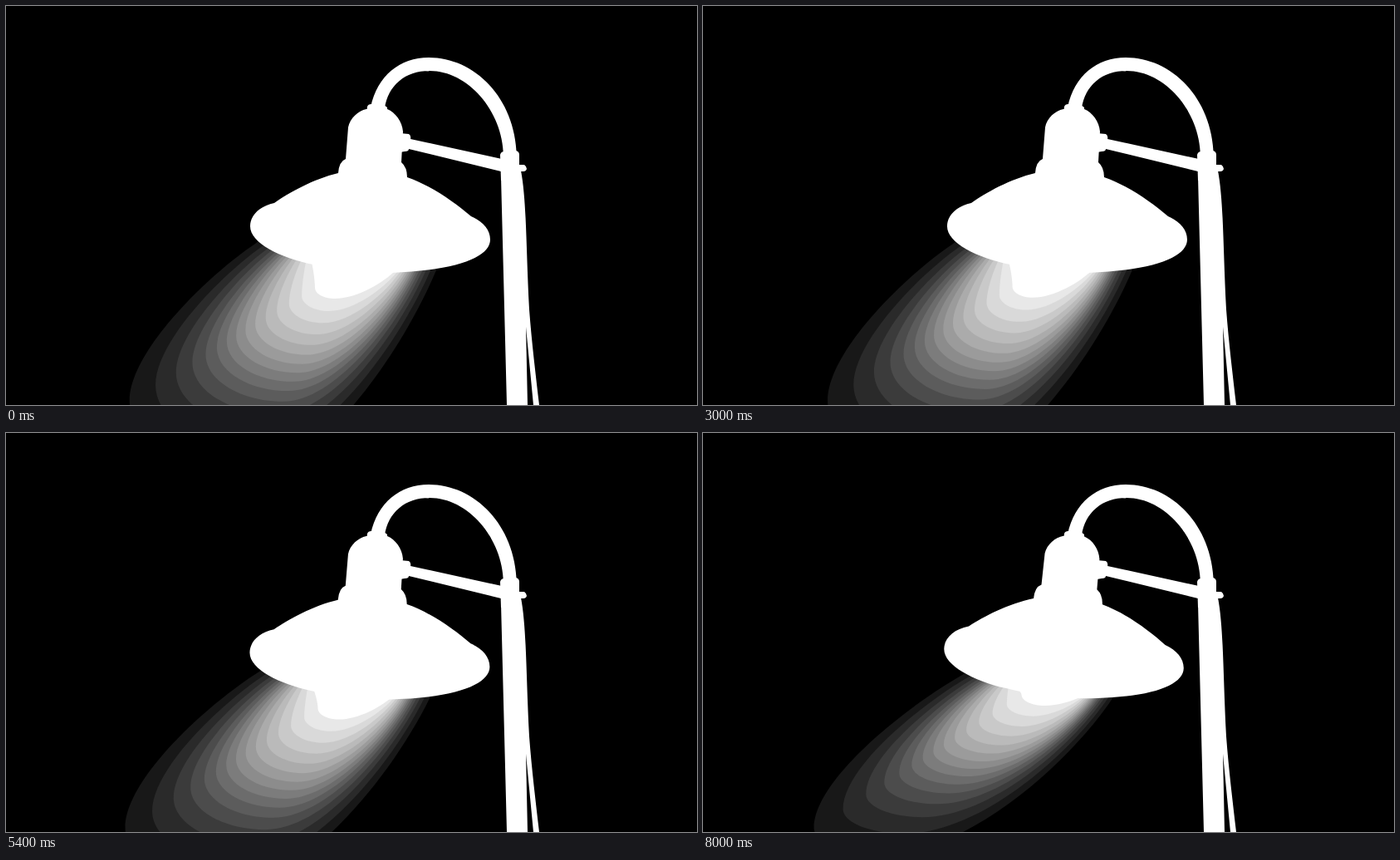
These frames come from a looping animation (832 px wide and 480 px high, 8100 ms). An HTML page:

```html
<!DOCTYPE html>
<html lang="en">
<head>
<meta charset="utf-8">
<title>Street lamp</title>
<style>
html, body { margin: 0; width: 100%; height: 100%; overflow: hidden; background: #000; }
svg { display: block; width: 100vw; height: 100vh; }
</style>
</head>
<body>
<svg viewBox="0 0 832 480">
  <g id="light"></g>
  <g fill="#fff">
    <!-- arched pipe -->
    <path d="M439 122C447 84 474 62 509 62C564 62 613 110 615 180L599 180C598 126 556 78 510 78C480 78 460 96 456 123Z"/>
    <!-- brace and its fittings -->
    <path d="M474 153L485 154Q488 156 487 160L597 184L596 199L485 172Q485 175 480 175L474 176Z"/>
    <path d="M595 179Q596 175 600 175L614 174Q618 175 618 179L618 191L624 191Q627 193 627 196Q626 199 623 199L618 199L618 210L596 210Z"/>
    <!-- post and cable -->
    <path d="M596 205L620 198C627 235 626 290 630 365C633 405 638 445 642 480L635 480L626 386L628 480L603 480Z"/>
    <path d="M435 121Q436 118 440 118L455 119L459 122L459 130L434 130Z"/>
    <path id="head" d="M412 146C414 135 424 126 434 124L459 124C469 128 477 139 478 151L476 188Q483 194 483 206
      C512 216 540 236 560 253C574 259 583 269 583 281C583 300 550 316 480 320
      C440 323 400 318 370 311C330 303 294 285 294 265C294 252 305 241 323 237C340 225 370 208 400 201Q401 187 409 184Z"/>
  </g>
</svg>
<script>
const LOOP = 8100, STEP = 100, BANDS = 14, RIM = 318;

// Beam at rest and fully tilted: its outer edge and its bright core
const rest = {
  outer: { start: 300, left: 156, lowX: 298, lowY: 562, right: 518 },
  core: { start: 367, left: 372, lowX: 396, lowY: 352, right: 469 }
};
const tilted = {
  outer: { start: 322, left: 133, lowX: 212, lowY: 505, right: 493 },
  core: { start: 372, left: 384, lowX: 412, lowY: 327, right: 453 }
};

const mix = (a, b, f) => a + (b - a) * f;

function blend(a, b, f) {
  const out = {};
  for (const key in a) out[key] = mix(a[key], b[key], f);
  return out;
}

const light = document.getElementById("light");
const head = document.getElementById("head");

// Bands lie wider apart near the outer edge
const bands = Array.from({ length: BANDS + 1 }, (_, i) => {
  const u = i / BANDS;
  const g = i === BANDS ? 255 : Math.round(24 + 208 * (i / (BANDS - 1)) ** .95);
  const path = document.createElementNS("http://www.w3.org/2000/svg", "path");
  path.setAttribute("fill", `rgb(${g},${g},${g})`);
  light.append(path);
  return { path, depth: u + 1.2 * u * (1 - u) ** 3 };
});

function contour(outer, core, f) {
  const { start, left, lowX, lowY, right } = blend(outer, core, f);
  const top = mix(286, 304, f);
  const side = mix(475, core.lowY - 13, f);
  const w = right - lowX, h = lowY - RIM;
  return `M${start} ${top}` +
    `C${mix(start, left, .39)} ${mix(top, side, .21)} ${left} ${mix(side, top, .31)} ${left} ${side}` +
    `C${left} ${mix(side, lowY, .55)} ${mix(lowX, left, .55)} ${lowY} ${lowX} ${lowY}` +
    `C${lowX + .37 * w} ${lowY} ${right - .19 * w} ${RIM + .42 * h} ${right} ${RIM}` +
    `L${right - 20} 290L${start + 20} 270Z`;
}

function draw(t) {
  const p = t / LOOP;
  const drift = p ** 3;
  const tilt = 1.7 * p ** 5;
  const sway = 8 * (1 - drift) * Math.cos(2 * Math.PI * (t - 1200) / 2800);
  const outer = blend(rest.outer, tilted.outer, drift);
  const core = blend(rest.core, tilted.core, drift);
  outer.left += sway;
  outer.lowX += sway;
  for (const { path, depth } of bands) path.setAttribute("d", contour(outer, core, depth));
  head.setAttribute("transform",
    `translate(447 130) scale(1 ${1 - tilt * .006}) rotate(${tilt}) translate(-447 -130)`);
}

const begin = performance.now();
function tick() {
  const t = (performance.now() - begin) % LOOP;
  draw(Math.floor(t / STEP) * STEP);
  requestAnimationFrame(tick);
}
tick();
</script>
</body>
</html>
```
